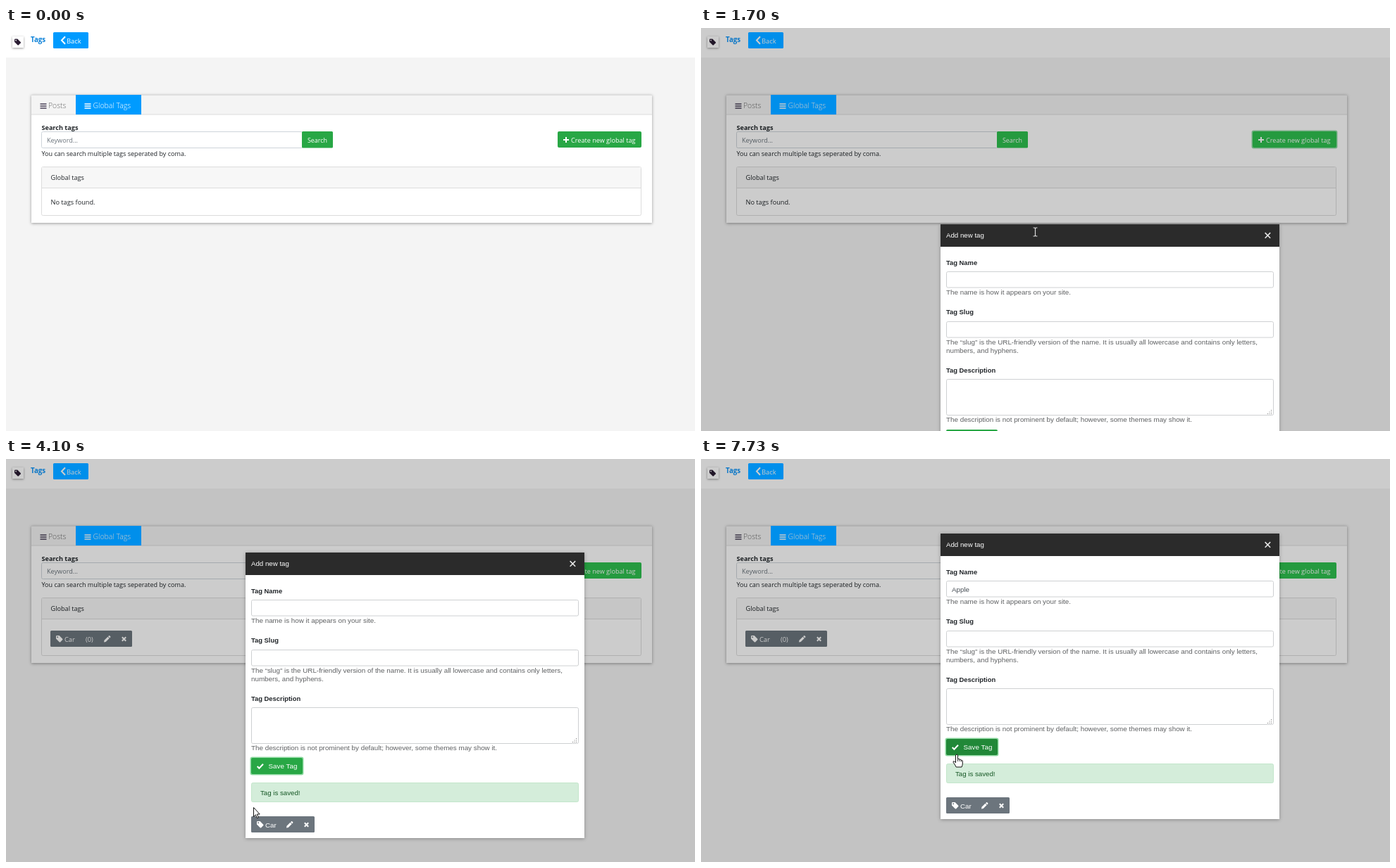
An HTML page with a canvas that plays this animation: 978 px wide and 573 px high, repeating every 8000 ms.

```html
<!DOCTYPE html>
<html lang="en">
<head>
<meta charset="utf-8">
<title>Global tags</title>
<style>
html, body { margin: 0; width: 978px; height: 573px; overflow: hidden; background: #f4f4f4; }
canvas { display: block; }
</style>
</head>
<body>
<canvas id="stage" width="978" height="573"></canvas>
<script>
const ctx = document.getElementById('stage').getContext('2d');
const LOOP = 8000;
const UI = '"Open Sans", "Noto Sans", sans-serif';
const FORM = '"Liberation Sans", Arial, sans-serif';
const BLUE = '#009bff', GREEN = '#28a745', GREEN_DARK = '#218838', SLATE = '#6c757d', INK = '#212529';

const ICONS = {
  tag: new Path2D('M0 1.2V4.8L5 9.7Q5.8 10.3 6.5 9.7L9.8 6.4Q10.3 5.7 9.7 5L4.8 0H1.2Q0 0 0 1.2Z'),
  pencil: new Path2D('M0 10L.5 7.2L5.8 1.9L8.1 4.2L2.8 9.5ZM6.4 1.3L7.4.3Q8 -.2 8.6.3L9.7 1.4Q10.2 2 9.7 2.6L8.7 3.6Z'),
  check: new Path2D('M.7 4.5L3.4 7.2L9 1.3'),
  cross: new Path2D('M.8 .8L6.2 6.2M6.2 .8L.8 6.2'),
  chevron: new Path2D('M6 .8L1 6L6 11.2'),
  plus: new Path2D('M4 0V8M0 4H8'),
  bars: new Path2D('M0 .8H9M0 3.8H9M0 6.8H9'),
  up: new Path2D('M0 4L3 1L6 4'),
  down: new Path2D('M0 1L3 4L6 1')
};
const CURSORS = {
  arrow: new Path2D('M.5 .5V13.5L3.4 10.8L5.4 15.5L7.4 14.6L5.4 10H9.2Z'),
  hand: new Path2D('M-1.5 1Q0 -1 1.5 1V6.5Q3.2 5.8 4 7.2Q5.6 6.6 6.3 8.2Q8.3 7.8 8.3 10V13Q8.3 15 7 18H-.8L-2.4 15L-5 11.2Q-5.2 9 -3.2 10L-1.5 11.8Z'),
  beam: new Path2D('M-3 -6H-1L0 -5L1 -6H3M0 -5V5M-3 6H-1L0 5L1 6H3')
};

// Screen updates arrive in bursts: start, end, count.
const BURSTS = [
  [600, 1390, 11], [1460, 1850, 6], [2000, 2740, 10], [2820, 3530, 10], [3630, 3630, 1],
  [3770, 3930, 3], [4100, 4420, 5], [4720, 4890, 3], [5050, 5600, 8], [5770, 5850, 2],
  [6020, 6020, 1], [6170, 6170, 1], [6340, 6560, 3], [7020, 7730, 10]
];
const POINTER = [
  [600, 700, 560, 'arrow'], [850, 800, 330, 'arrow'], [1070, 862, 190, 'arrow'],
  [1153, 873, 160, 'hand'], [1390, 873, 160, 'arrow'], [1540, 655, 230, 'arrow'],
  [1694, 474, 290, 'beam'], [1850, 455, 303, 'arrow'], [2000, 452, 300, 'arrow'],
  [2160, 436, 235, 'arrow'], [2410, 430, 206, 'beam'], [3140, 430, 206, 'beam'],
  [3290, 410, 290, 'arrow'], [3530, 378, 437, 'hand'], [3630, 376, 434, 'hand'],
  [3770, 372, 436, 'hand'], [3850, 362, 466, 'arrow'], [3930, 352, 494, 'arrow'],
  [4420, 349, 498, 'arrow'], [4640, 349, 498, 'arrow'], [4889, 410, 238, 'arrow'],
  [5000, 410, 238, 'arrow'], [5200, 411, 190, 'beam'], [6950, 411, 190, 'beam'],
  [7180, 385, 280, 'arrow'], [7410, 352, 396, 'arrow'], [7490, 359, 414, 'hand'], [7650, 363, 420, 'hand']
];
const TYPED = [[0, ''], [2820, 'C'], [2977, 'Ca'], [3135, 'Car'], [4100, ''],
  [5770, 'A'], [6170, 'Ap'], [6340, 'App'], [6450, 'Appl'], [6560, 'Apple']];
const CLICKS = [[1231, 1311], [2573, 2656], [3630, 3770], [5364, 5442], [7650, 7729]];
const FOCUS = [[2573, 3770], [5364, 7650]];
const CARET = [[2573, 3135], [5364, 6020], [6170, 7020]];
const SUGGESTIONS = ['afwawf', 'awf', 'afw', 'afwawffawfwwa', 'awfwa', 'afwafw3'];

const during = (t, spans) => spans.some(([a, b]) => t >= a && t < b);
const latest = (rows, t) => rows.reduce((hit, row) => row[0] <= t ? row : hit, rows[0]);
const ramp = (t, a, b) => Math.min(1, Math.max(0, (t - a) / (b - a)));

function snap(t) {
  if (t < BURSTS[0][0]) return t;
  const [start, end, count] = latest(BURSTS, t);
  if (count === 1) return start;
  const step = (end - start) / (count - 1);
  return start + step * Math.min(count - 1, Math.floor((t - start) / step + 0.01));
}

let dim = false;
function tone(hex) {
  if (!dim) return hex;
  const full = hex.length === 4 ? hex.replace(/\w/g, '$&$&') : hex;
  const rgb = [1, 3, 5].map(i => parseInt(full.slice(i, i + 2), 16));
  const vivid = Math.max(...rgb) - Math.min(...rgb) > 90;
  return `rgb(${rgb.map(v => Math.round(v * (vivid ? 0.92 : 0.8)))})`;
}

function rect(x, y, w, h, fill) {
  ctx.fillStyle = tone(fill);
  ctx.fillRect(x, y, w, h);
}
function round(x, y, w, h, fill, border, r = 2) {
  ctx.beginPath();
  if (border) ctx.roundRect(x + 0.5, y + 0.5, w - 1, h - 1, r);
  else ctx.roundRect(x, y, w, h, r);
  ctx.fillStyle = tone(fill);
  ctx.fill();
  if (border) {
    ctx.strokeStyle = tone(border);
    ctx.lineWidth = 1;
    ctx.stroke();
  }
}
function shadowed(x, y, w, h, fill, blur, alpha) {
  ctx.save();
  ctx.shadowColor = `rgba(0,0,0,${alpha})`;
  ctx.shadowBlur = blur;
  ctx.shadowOffsetY = 1;
  rect(x, y, w, h, fill);
  ctx.restore();
}
function text(str, x, y, size, color = INK, font = UI, weight = 400) {
  ctx.font = `${weight} ${size}px ${font}`;
  ctx.fillStyle = tone(color);
  ctx.fillText(str, x, y);
}
function icon(name, x, y, color, line = 0, scale = 1) {
  ctx.save();
  ctx.translate(x, y);
  ctx.scale(scale, scale);
  ctx.strokeStyle = ctx.fillStyle = tone(color);
  ctx.lineWidth = line;
  if (line) ctx.stroke(ICONS[name]);
  else ctx.fill(ICONS[name]);
  ctx.restore();
}
function tagIcon(x, y, color, hole, scale) {
  icon('tag', x, y, color, 0, scale);
  ctx.beginPath();
  ctx.arc(x + 2.3 * scale, y + 2.3 * scale, scale, 0, 7);
  ctx.fillStyle = tone(hole);
  ctx.fill();
}
function greenButton(x, y, w, h, hover, ring) {
  if (ring) round(x - 1.5, y - 1.5, w + 3, h + 3, '#8fdaa2', null, 3);
  round(x, y, w, h, hover ? GREEN_DARK : GREEN);
}

function drawPage(t) {
  const saved = t >= 4100;
  const grow = saved ? 13 : 0;
  rect(0, 0, 978, 573, '#f4f4f4');
  rect(0, 0, 978, 42, '#fff');

  shadowed(9, 12, 16, 16, '#fff', 3, 0.4);
  tagIcon(12, 15.5, '#2b1d33', '#fff', 0.9);
  text('Tags', 35, 20, 9.8, '#0a80d8', UI, 700);
  round(67, 6, 50, 23, BLUE, null, 1.5);
  icon('chevron', 78, 11.5, '#fff', 2);
  text('Back', 86, 21.5, 9.4, '#fff');

  shadowed(36, 95, 881, 182 + grow, '#fff', 4, 0.38);
  rect(36, 95, 881, 28, '#f4f4f4');
  rect(36, 122.5, 881, 1, '#dddddd');
  rect(36, 95, 881, 1, '#dedede');
  rect(99, 95, 93, 28, BLUE);
  icon('bars', 48.5, 107.2, '#494057', 1.5);
  text('Posts', 60, 114, 10.4, '#6b6b6b', UI, 300);
  icon('bars', 111.5, 107.2, '#fff', 1.5);
  text('Global Tags', 123.5, 114, 10.5, '#fff', UI, 300);

  text('Search tags', 50.5, 144.5, 9.1, INK, UI, 700);
  round(50, 147, 372, 24, '#fff', '#ced4da');
  text('Keyword...', 58, 163, 9.1, SLATE);
  round(420, 147, 44, 23.5, GREEN, null, 1.5);
  text('Search', 428, 163, 8.9, '#fff');
  text('You can search multiple tags seperated by coma.', 50.5, 182, 9.06);

  greenButton(783, 147, 119, 23, t >= 1153 && t < 1390, t >= 1311 && t < 2573);
  icon('plus', 791, 155, '#fff', 2);
  text('Create new global tag', 802, 162.5, 9.12, '#fff');

  round(50, 197, 852, 70 + grow, '#fff', '#dcdcdc');
  rect(51, 198, 850, 29, '#f7f7f7');
  rect(51, 227, 850, 1, '#dcdcdc');
  text('Global tags', 63.5, 216, 9.15);
  if (saved) {
    badge(63, 244, 116, UI);
    text('(0)', 113, 259.5, 9.2, '#fff');
  } else {
    text('No tags found.', 63.5, 250.5, 9.2);
  }
}

function badge(x, y, w, font) {
  round(x, y, w, 23, SLATE, null, 1.5);
  tagIcon(x + 8, y + 7, '#fff', SLATE, 0.95);
  text('Car', x + 20, y + 15.5, font === UI ? 9.3 : 9.8, '#fff', font);
  icon('pencil', x + w - 40, y + 7, '#fff', 0, 0.95);
  icon('cross', x + w - 15, y + 8.5, '#fff', 2);
}

function modalTop(t) {
  if (t < 2000) return 573 - 440 * ramp(t, 1380, 1850);
  return 133 - 27 * (1 - (1 - ramp(t, 4100, 4420)) ** 2);
}

function field(y, h, focused) {
  if (focused) round(346, y - 2, 469, h + 4, '#d5e9ff', null, 3);
  round(348, y, 465, h, '#fff', focused ? '#70b5fb' : '#ced0d2');
}

function drawModal(t) {
  const top = modalTop(t), saved = t >= 4100, height = saved ? 406 : 351;
  const label = (str, y) => text(str, 348, top + y, 9.4, INK, FORM, 700);
  const hint = (str, y) => text(str, 348, top + y, 9.84, '#5f6163', FORM);
  shadowed(340, top, 481, height, '#fff', 5, 0.3);
  rect(340, top, 481, 32, '#2b2b2b');
  text('Add new tag', 348, top + 19, 9.7, '#fff', FORM);
  icon('cross', 799.5, top + 11, '#e8e8e8', 1.1, 1.4);

  label('Tag Name', 57.5);
  const focused = during(t, FOCUS), name = latest(TYPED, t)[1];
  field(top + 67, 23.5, focused);
  text(name, 356, top + 82.5, 9.8, '#495057', FORM);
  if (during(t, CARET)) rect(Math.round(356.5 + ctx.measureText(name).width) - 1, top + 73, 1, 12, '#222');
  hint('The name is how it appears on your site.', 100);

  label('Tag Slug', 128);
  field(top + 138, 23.5);
  hint('The “slug” is the URL-friendly version of the name. It is usually all lowercase and contains only letters,', 171);
  hint('numbers, and hyphens.', 182.8);

  label('Tag Description', 210.5);
  field(top + 220, 52);
  for (let i = 0; i < 3; i++)
    for (let j = 0; j <= i; j++) rect(809 - 2.5 * j, top + 264 + 2.5 * i, 1, 1, '#777');
  hint('The description is not prominent by default; however, some themes may show it.', 281);

  const hover = (t >= 3450 && t < 3850) || t >= 7490;
  const ring = (t >= 3770 && t < 5364) || t >= 7650;
  greenButton(348, top + 292, 73, 23, hover, ring);
  icon('check', 356, top + 299.5, '#fff', 2.1);
  text('Save Tag', 372.5, top + 307, 9.8, '#fff', FORM);

  if (saved) {
    round(348, top + 327, 465, 28, '#d4edda', '#c3e6cb');
    text('Tag is saved!', 361, top + 344.5, 9.7, '#155724', FORM);
    badge(348, top + 375, 90, FORM);
  }
  if (t >= 2898 && t < 3630) drawSuggestions(top + 91, 18, ['Car']);
  if (t >= 5850 && t < 6170) drawSuggestions(top + 90, 97, SUGGESTIONS);
}

function drawSuggestions(y, h, items) {
  rect(353, y + 3, 462, h, '#8c8c8c');
  round(348, y, 465, h, '#fff', '#a0a0a0', 0);
  items.forEach((item, i) => text(item, 353, y + 12 + 16 * i, 9.2, '#000'));
  if (items.length === 1) return;
  rect(799, y + 1, 13, h - 2, '#f0f0f0');
  rect(799, y + 14, 12, 13, '#cdcdcd');
  icon('up', 802, y + 5, '#505050', 1.5);
  icon('down', 802, y + h - 10, '#505050', 1.5);
}

function drawPointer(t) {
  if (t < POINTER[0][0]) return;
  const from = latest(POINTER, t);
  const to = POINTER[POINTER.indexOf(from) + 1] || from;
  const p = to === from ? 0 : ramp(t, from[0], to[0]);
  const x = Math.round(from[1] + (to[1] - from[1]) * p);
  const y = Math.round(from[2] + (to[2] - from[2]) * p);
  if (during(t, CLICKS)) {
    ctx.beginPath();
    ctx.arc(x, y, 10, 0, 7);
    ctx.fillStyle = 'rgba(225,205,0,.75)';
    ctx.fill();
  }
  ctx.save();
  ctx.translate(x, y);
  const shape = CURSORS[from[3]];
  ctx.lineJoin = 'round';
  ctx.lineWidth = 1;
  if (from[3] === 'beam') {
    ctx.translate(0.5, 0);
    ctx.lineWidth = 1.2;
  } else {
    ctx.fillStyle = '#fff';
    ctx.fill(shape);
  }
  ctx.strokeStyle = '#111';
  ctx.stroke(shape);
  if (from[3] === 'hand') {
    ctx.lineWidth = 0.8;
    ctx.stroke(new Path2D('M1.5 6.5V10M4 7.2V10M6.3 8.2V10.5'));
  }
  // The beam turns white over the dark title bar.
  if (from[3] === 'beam' && t < 1850) {
    ctx.strokeStyle = '#ddd';
    ctx.stroke(shape);
  }
  ctx.restore();
}

function draw(now) {
  const t = snap(now % LOOP);
  dim = t >= 1389;
  drawPage(t);
  dim = false;
  if (t >= 1389) drawModal(t);
  drawPointer(t);
}

const begin = performance.now();
function frame() {
  draw(performance.now() - begin);
  requestAnimationFrame(frame);
}
frame();
</script>
</body>
</html>
```
